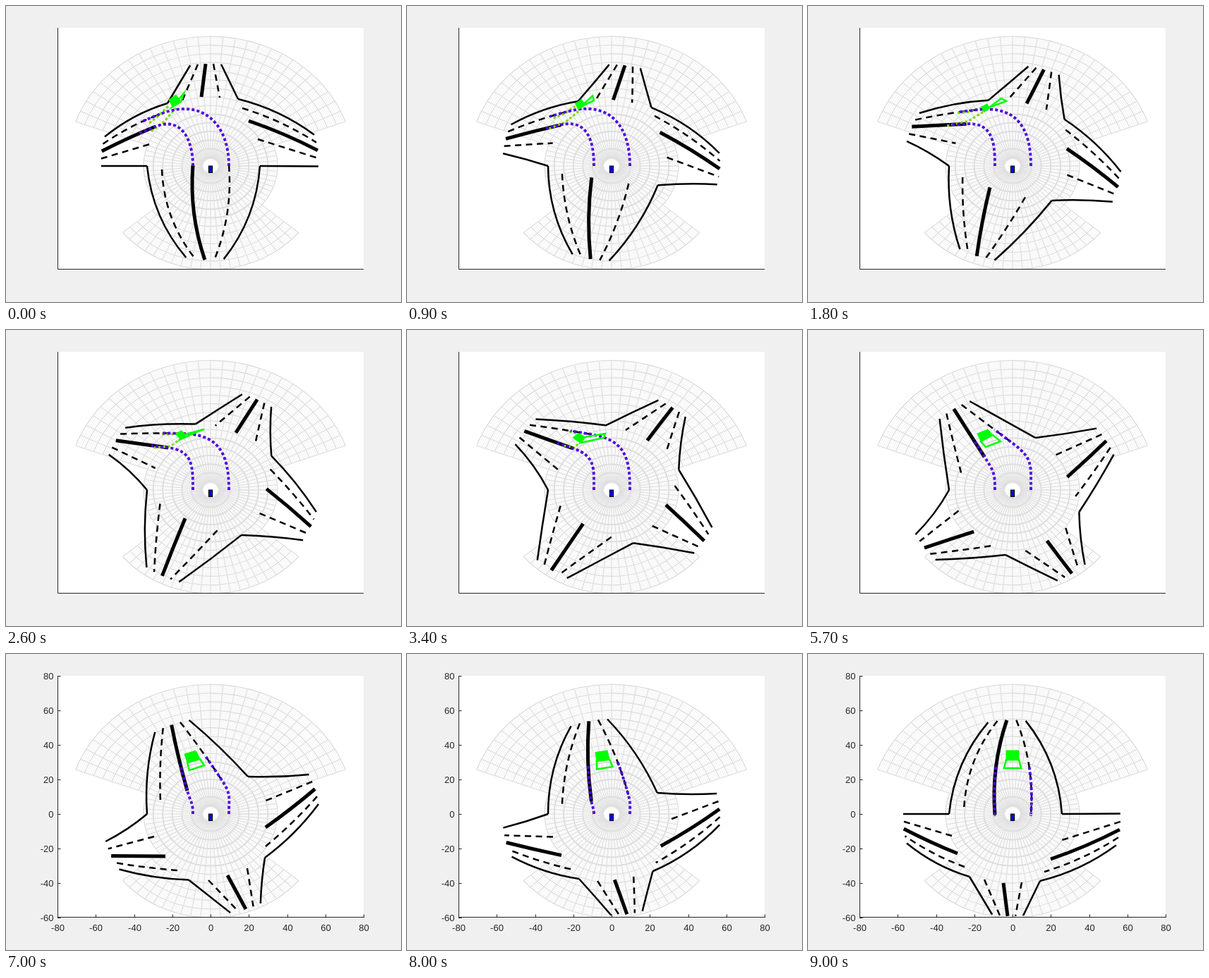
Animation of 560 by 420 pixels, one loop 9100 ms. Source, as an HTML page with a canvas:

```html
<!DOCTYPE html>
<html lang="en">
<head>
<meta charset="utf-8">
<title>Rotating junction</title>
<style>
html, body { margin: 0; width: 560px; height: 420px; overflow: hidden; background: #f0f0f0 }
canvas { display: block }
</style>
</head>
<body>
<canvas id="stage" width="560" height="420"></canvas>
<script>
const g = document.getElementById('stage').getContext('2d');
const STEPS = 90, OX = 290, OY = 227, SX = 2.7125, SY = 2.45, RAD = Math.PI / 180;
const px = x => OX + x * SX, py = y => OY - y * SY;
const mix = (a, b, t) => a + (b - a) * t;
const mixPt = (p, q, t) => [mix(p[0], q[0], t), mix(p[1], q[1], t)];

// Smooth polynomial through values given at five steps
const KNOTS = [0, 20, 45, 70, 90];
const smooth = (v, k) => v.reduce((sum, y, i) =>
  sum + KNOTS.reduce((f, n, j) => j === i ? f : f * (k - n) / (KNOTS[i] - n), y), 0);

const cornerB = { x: [229, 259, 301, 343, 360], y: [138, 133.5, 141, 174, 227] };
const solid = { w: 2.5 }, thick = { w: 5 }, dashed = { w: 2.5, dash: [9, 6.5] };

// Lane lines of an arm: inner end (x, y), sideways bulge and line style
const nearArm = {
  angle: k => 173.8 - 0.902 * k + 0.7 * Math.sin(k / STEPS * Math.PI),
  spread: [8.6, 10],
  lines: [
    { ...solid, x: [200, 200, 200, 200, 200], y: [227, 227, 227, 227, 227], b: [0, -2, -2, 5, 11] },
    { ...dashed, x: [204, 210, 216, 219, 221], y: [196, 195, 201, 210, 222], b: [0, 0, 0, 2, 11] },
    { ...thick, x: [212, 226, 243, 257, 265], y: [171, 167, 172, 194, 228], b: [-1, 0, 0, 1, 7] },
    { ...dashed, x: [222, 243, 275, 306, 316], y: [152, 147, 152, 179, 228], b: [-3, -1, 0, -1, -8] },
    { ...solid, ...cornerB, b: [-5, -3, 0, -2, -11] }
  ]
};
const farArm = {
  angle: k => 92.2 - 1.099 * k + 1.4 * Math.sin(k / STEPS * Math.PI),
  spread: [8.2, 9.3],
  lines: [
    { ...solid, ...cornerB, b: [0, 0, 0, -1.5, 0] },
    { ...dashed, x: [250, 287, 329, 366, 357], y: [134, 133, 156, 209, 265], b: [0, 0, 0, 0, 0] },
    { ...thick, x: [277, 314, 357, 368, 344], y: [129, 140, 178, 246, 291], b: [0, 0, 0, -1, -2] },
    { ...dashed, x: [303, 342, 378, 368, 335], y: [130, 150, 202, 273, 309], b: [0, 0, 0, -2, -4] },
    { ...solid, x: [329, 367, 390, 367, 329], y: [132, 165, 227, 289, 322], b: [0, 1, 1, -4, -6] }
  ]
};

// Vehicle: four corners of the filled front, then the two rear corners
const car = [
  [0, 231, 133, 241, 126, 248, 136, 236, 143, 249, 133, 252, 124],
  [18, 246, 143, 254, 139, 257, 144, 249, 150, 281, 135, 274, 131],
  [34, 235, 153, 243, 146, 252, 152, 246, 160, 281, 147, 279, 153],
  [48, 233, 151, 247, 143, 254, 149, 240, 159, 269, 156, 251, 166],
  [57, 240, 147, 255, 141, 262, 149, 245, 158, 273, 158, 252, 166],
  [70, 253, 142, 269, 137, 275, 149, 257, 154, 281, 158, 260, 165],
  [90, 281, 137, 299, 137, 299, 150, 281, 150, 302, 162, 278, 162]
];
// Two short paths of the vehicle, three points each
const trails = [
  [0, 206, 178, 222, 166, 243, 143, 203, 166, 216, 156, 231, 141],
  [18, 197, 170, 228, 163, 252, 148, 212, 152, 230, 150, 246, 144],
  [34, 222, 164, 238, 167, 244, 160, 230, 144, 238, 146, 244, 150],
  [40, 225, 164, 238, 167, 242, 158, 236, 143, 240, 147, 244, 150]
];

function keyed(rows, k) {
  let i = 1;
  while (i < rows.length - 1 && rows[i][0] < k) i++;
  const a = rows[i - 1], b = rows[i], t = (k - a[0]) / (b[0] - a[0]);
  const pts = [];
  for (let n = 1; n < a.length; n += 2) pts.push([mix(a[n], b[n], t), mix(a[n + 1], b[n + 1], t)]);
  return pts;
}

function stroke(color, width, dash = []) {
  g.strokeStyle = color;
  g.lineWidth = width;
  g.setLineDash(dash);
  g.stroke();
}

function polyline(pts, close) {
  g.beginPath();
  pts.forEach(p => g.lineTo(...p));
  if (close) g.closePath();
}

// Inner end, control point and outer end of lane line i
function laneCurve(arm, i, k) {
  const line = arm.lines[i], s = Math.sin(k / STEPS * Math.PI);
  const p = [smooth(line.x, k), smooth(line.y, k)];
  const a = (arm.angle(k) + mix(...arm.spread, k / STEPS) * (1 - i / 2)) * RAD;
  const q = [px(-0.4 + 0.7 * s + 56.8 * Math.cos(a)), py(2.4 - 4.8 * k / STEPS + 56.8 * Math.sin(a))];
  const dx = q[0] - p[0], dy = q[1] - p[1], bulge = 2 * smooth(line.b, k) / Math.hypot(dx, dy);
  return [p, [(p[0] + q[0]) / 2 + dy * bulge, (p[1] + q[1]) / 2 - dx * bulge], q];
}

function drawArm(arm, k, fromInner) {
  arm.lines.forEach((line, i) => {
    const c = laneCurve(arm, i, k);
    if (!fromInner) c.reverse();
    g.beginPath();
    g.moveTo(...c[0]);
    g.quadraticCurveTo(...c[1], ...c[2]);
    stroke('#000', line.w, line.dash);
  });
}

// Dotted route from the ego position into a lane line
function drawRoute(startX, i, k) {
  const s = [startX, 227], [p, c, q] = laneCurve(nearArm, i, k);
  const t = 0.32 + 0.18 * (k / STEPS) ** 3;
  const len = 0.5 * Math.hypot(p[0] - s[0], p[1] - s[1]);
  const dx = c[0] - p[0], dy = c[1] - p[1], u = len / Math.hypot(dx, dy);
  const mid = mixPt(p, c, t);
  g.beginPath();
  g.moveTo(...s);
  g.bezierCurveTo(s[0], s[1] - len, p[0] - dx * u, p[1] - dy * u, ...p);
  g.quadraticCurveTo(...mid, ...mixPt(mid, mixPt(c, q, t), t));
  stroke('#4b00e1', 3.8, [4, 3.2]);
}

function drawSector(from, to, r0, r1) {
  for (let r = r0 + 1; r <= r1; r++) {
    const major = r % 5 === 0;
    g.beginPath();
    g.ellipse(OX, OY, r * SX, r * SY, 0, -to * RAD, -from * RAD);
    stroke(major ? '#dcdcdc' : '#eeeeee', major ? (r < 35 ? 2 : 1.3) : 0.8);
  }
  for (let a = from; a <= to; a += 5) {
    const c = Math.cos(a * RAD), s = Math.sin(a * RAD);
    polyline([[px(r0 * c), py(r0 * s)], [px(r1 * c), py(r1 * s)]]);
    stroke('#e0e0e0', 1.2);
  }
}

function drawGrid() {
  drawSector(0, 360, 4, 35);
  drawSector(20, 160, 35, 75);
  drawSector(220, 320, 35, 60);
}

function drawCar(k) {
  const p = keyed(car, k);
  polyline([p[2], p[4], p[5], p[3]], true);
  stroke('#0f0', 2.5);
  polyline(p.slice(0, 4), true);
  g.fillStyle = '#0f0';
  g.fill();
  stroke('#0f0', 1);
}

function drawLabels() {
  g.font = '13px "Liberation Sans", Arial, sans-serif';
  g.fillStyle = '#262626';
  g.textAlign = 'center';
  for (let v = -80; v <= 80; v += 20) {
    const x = Math.round(px(v)) + 0.5;
    g.fillText(v, x, 393);
    polyline([[x, 374], [x, 369.5]]);
    stroke('#262626', 1);
  }
  g.textAlign = 'right';
  for (let v = -60; v <= 80; v += 20) {
    const y = Math.round(py(v)) + 0.5;
    g.fillText(v, 67.5, y + 4.5);
    polyline([[73, y], [77.5, y]]);
    stroke('#262626', 1);
  }
}

function draw(k) {
  g.fillStyle = '#f0f0f0';
  g.fillRect(0, 0, 560, 420);
  g.fillStyle = '#fff';
  g.fillRect(73, 31, 434, 343);
  g.save();
  g.beginPath();
  g.rect(73, 31, 434, 343);
  g.clip();
  drawGrid();
  drawArm(nearArm, k);
  drawArm(farArm, k);
  // The other two arms run backwards, upside down
  g.save();
  g.transform(1, 0, 0, -1, 0, 2 * OY);
  drawArm(nearArm, STEPS - k, true);
  drawArm(farArm, STEPS - k, true);
  g.restore();
  if (k < 40) {
    const p = keyed(trails, k);
    for (const part of [p.slice(0, 3), p.slice(3)]) {
      polyline(part);
      stroke('#7be000', 3.2, [3.5, 3]);
    }
  }
  drawRoute(265, 2, k);
  drawRoute(316, 3, k);
  drawCar(k);
  g.fillStyle = '#00f';
  g.fillRect(287.5, 227, 5, 9.5);
  g.beginPath();
  g.rect(287.5, 227, 5, 9.5);
  stroke('#000', 1.2);
  g.restore();
  polyline([[73.5, 31], [73.5, 373.5], [507, 373.5]]);
  stroke('#262626', 1);
  if (k > 60) drawLabels();
}

let shown = -1;
function tick() {
  const k = Math.floor(performance.now() / 100) % (STEPS + 1);
  if (k !== shown) draw(shown = k);
  requestAnimationFrame(tick);
}
tick();
</script>
</body>
</html>
```
